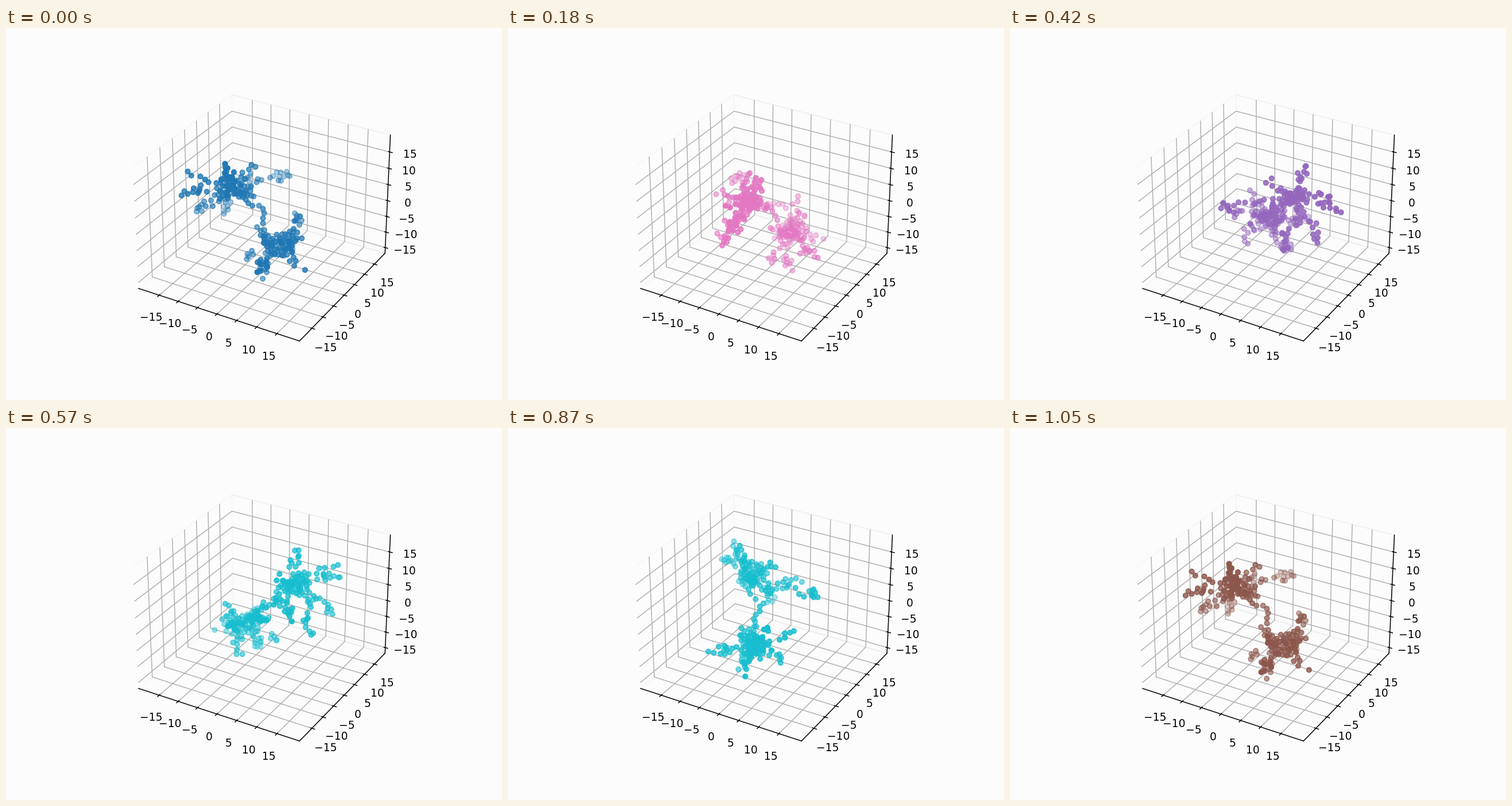
These frames come from a looping animation (864 by 648 pixels, 1.08 s). A matplotlib script:

```python
import numpy as np
import matplotlib.pyplot as plt
from matplotlib.animation import ArtistAnimation

FRAMES, INTERVAL = 36, 30
DENSITY = 1.55     # points per unit of arm length
WANDER = 0.75      # spread of each random step
MIN_GAP = 1.3      # points keep at least this far apart
BACKGROUND = "#fcfcfc"

# Two clusters, each a hub with arm tips: (right, away from viewer, up).
UPPER_HUB = (-6.5, 0.5, 8.5)
UPPER_TIPS = [(-8.4, -2.2, 17.5), (-16.5, 0.5, 13.2), (-18, -1.7, 8),
              (-15.1, 2.6, 0), (-9.2, 7.2, -1.8), (-1.9, 3.4, 13.1),
              (-3.2, 10.9, 5.5), (4.5, 9.2, 6.5)]
LOWER_HUB = (4, -5, -5)
LOWER_TIPS = [(7, 3, -1), (7.9, -3.9, 3), (8.3, -5.4, -2.7),
              (9, -10, -9.1), (-1.4, -13.6, -7), (-0.3, -6.9, -14.2),
              (-3.6, -3, -9.6), (6.4, 0.2, -10.2), (-1.3, -2, -2)]


def walk(start, end, rng):
    """Random walk pinned to both of its ends."""
    start, end = np.array(start), np.array(end)
    n = int(DENSITY * np.linalg.norm(end - start))
    t = np.linspace(0, 1, n)[:, None]
    drift = np.cumsum(rng.normal(0, WANDER, (n, 3)), axis=0)
    drift -= drift[0] + t * (drift[-1] - drift[0])
    return start + t * (end - start) + drift


def spread(points, rounds=25):
    """Push apart pairs that are closer than MIN_GAP."""
    for _ in range(rounds):
        diff = points[:, None] - points
        dist = np.linalg.norm(diff, axis=2) + 1e-6
        push = np.clip(MIN_GAP - dist, 0, None) / dist
        points = points + 0.3 * (push[..., None] * diff).sum(axis=1)
    return points


def make_cloud():
    rng = np.random.default_rng(4)
    arms = [walk(tip, UPPER_HUB, rng) for tip in UPPER_TIPS]
    arms.append(walk(UPPER_HUB, LOWER_HUB, rng))
    arms += [walk(LOWER_HUB, tip, rng) for tip in LOWER_TIPS]
    return spread(np.concatenate(arms))


def rotate_z(points, angle):
    c, s = np.cos(angle), np.sin(angle)
    x, y, z = points.T
    return c * x - s * y, s * x + c * y, z


fig = plt.figure(figsize=(6.4, 4.8), dpi=135, facecolor=BACKGROUND)
ax = fig.add_subplot(projection="3d", facecolor=BACKGROUND)
ax.view_init(elev=30, azim=-60)

# The cloud is given in view directions, which lie 30 degrees off the axes.
cloud = make_cloud()
turns = np.linspace(0, 2 * np.pi, FRAMES) + np.pi / 6
frames = [[ax.scatter(*rotate_z(cloud, turn), color=f"C{i % 10}")]
          for i, turn in enumerate(turns)]

ax.set(xlim=(-20.5, 20.5), ylim=(-20.5, 20.5), zlim=(-16.85, 20.1))
for axis in (ax.xaxis, ax.yaxis, ax.zaxis):
    axis.set_ticks(np.arange(-15, 16, 5))
    axis.pane.set_fill(False)

anim = ArtistAnimation(fig, frames, interval=INTERVAL, repeat=True,
                       repeat_delay=0, blit=False)
plt.show()
```
